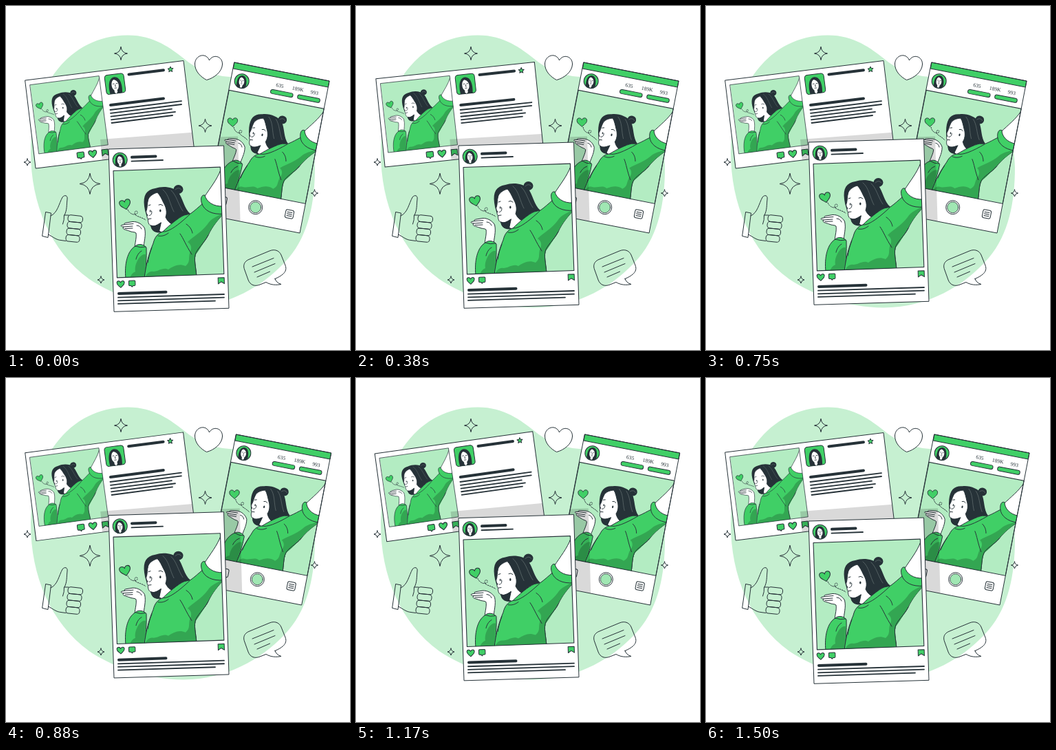
Animation of 500 by 500 pixels, one loop 1540 ms. Source, as an HTML page:

```html
<!DOCTYPE html>
<html lang="en">
<head>
<meta charset="utf-8">
<title>Selfie posts</title>
<style>
  html, body { margin: 0; height: 100%; overflow: hidden; background: #fff; }
  svg { display: block; width: 100%; height: 100%; }
  .o { fill: none; stroke: #263238; stroke-linecap: round; stroke-linejoin: round; }
  .w { fill: #fff; stroke: #263238; stroke-linejoin: round; }
  .g { fill: #40cf66; stroke: #263238; stroke-linejoin: round; }
  .k { fill: #263238; }
  .d { fill: #33a652; }
  .thick { stroke-width: 4; }
  .thin { stroke-width: 1.8; }
  text { font: 7.6px "Liberation Serif", serif; fill: #263238; text-anchor: middle; }
</style>
</head>
<body>
<svg viewBox="0 0 500 500">
  <defs>
    <clipPath id="square"><path d="M0 0H155.5V155.5H0Z"/></clipPath>
    <clipPath id="leftClip"><path d="M28 108L258 79.5L273.5 207.5L43.5 236Z"/></clipPath>
    <clipPath id="phoneClip"><path d="M332 82L470 109L427 330L289 303Z"/></clipPath>
    <clipPath id="disc"><circle r="10.3"/></clipPath>
    <clipPath id="tile"><rect x="-14" y="-14" width="28" height="28" rx="4"/></clipPath>

    <path id="spark" class="o" vector-effect="non-scaling-stroke" d="M0 -10Q1 -1 10 0Q1 1 0 10Q-1 1 -10 0Q-1 -1 0 -10Z"/>
    <path id="love" class="g" d="M0 5C-3 2 -5.5 1 -5.5 -2C-5.5 -5.5 -1 -5.5 0 -2.5C1 -5.5 5.5 -5.5 5.5 -2C5.5 1 3 2 0 5Z"/>
    <path id="chat" class="g" d="M-3.5 -4.2H3.5Q4.7 -4.2 4.7 -3V2Q4.7 3.2 3.5 3.2H1.5L0 5L-1.5 3.2H-3.5Q-4.7 3.2 -4.7 2V-3Q-4.7 -4.2 -3.5 -4.2Z"/>
    <path id="mark" class="g" d="M-4.5 -4.5H4.5V4.5L0 1.5L-4.5 4.5Z"/>

    <g id="face">
      <path class="k" d="M-6.5 11C-8 2 -7 -8 0 -8.3C7 -8 8 2 6.5 11Z"/>
      <path fill="#fff" d="M-1 -5.6C-4.5 -4 -4.4 2 -3 4.5L-1.6 6.3V8.5L0 10L1.6 8.5V6.3L3 4.5C4.4 2 4.5 -4 -1 -5.6Z"/>
      <path class="o" stroke-width=".6" d="M-2.4 -1H-1M1.2 -1H2.6M.2 0L-.2 2H.4M-.9 3.8H1"/>
    </g>

    <g id="photo">
      <g clip-path="url(#square)">
        <path fill="#b3ecc2" d="M0 0H156V156H0Z"/>
        <g transform="rotate(2) translate(-156 -239.5)" stroke-width="1">
          <path class="k" d="M201 291C199 275 204 267 217 265C228 261 243 263 250 270C257 279 259 295 268 302C263 305 254 304 250 310L238 321L226 329C216 331 210 325 210 317C205 308 202 300 201 291Z"/>
          <ellipse class="k" cx="250.500" cy="266.500" rx="7" ry="6.500"/>
          <path class="o" style="stroke:#7f8c8a" stroke-width=".5" d="M228 267C237 274 238 288 244 299M240 268C248 275 250 288 257 298M246 267Q251 262 255 267"/>
          <path class="w" d="M220 271C213 273 208 277 206.500 282C205 288 205.500 292 204.500 296C203 299 204 302 206 304C204 306 205.500 308 206.500 310C206 316 209 321 215 320C219 319 222 317 225 315L222 327L229 330L241 317C236 314 234 311 232 307C235 299 232 291 229 286C226 280 224 275 220 271Z"/>
          <ellipse class="k" cx="224.300" cy="297.500" rx="1.200" ry="2"/>
          <ellipse class="k" cx="209.600" cy="298" rx=".8" ry="1.800"/>
          <path class="o" d="M222 289Q225 287 228 290M207 290L210 289M211.500 298C213 302 210 305 208 304.500M207 309.500L211 309"/>
          <path class="k" d="M210 318Q216 322 226 314L223 328Q212 331 210 318Z"/>

          <path class="w" d="M312 238C307 252 297 264 288 278L296 300L318 300V234Z"/>

          <path class="w" d="M201.500 323C198 317 191 313 184 313.500L175 315C172 315.500 171 316.500 173 317.500L168 318.500C166 319.500 168 321 171 321L170 323C171 325 175 325.500 179 327C183 329 187 328 189 330C190 336 188 342 187 351L200 353C200 343 204 334 201.500 323Z"/>
          <path class="o" d="M173 317.500L185 316.500M171 321L184 320M173 323.500L184 323M190 319Q195 319 197 324"/>

          <path class="g" d="M188 349C176 356 172 376 174 396H203C202 382 205 366 204 351C200 346 192 345 188 349Z"/>
          <path class="d" d="M200 361C192 364 186 378 188 386C184 388 181 391 180 396H202C201 382 203 372 203 361Z"/>
          <path class="o" d="M188 349Q195 352 203 350M197 356C192 359 190 364 189 368"/>

          <path class="g" d="M201 396C203 377 208 359 214 345C216 336 221 330 228 328C237 319 250 308 259 304L268 302C275 297 280 292 285 288C282 280 284 274 289 275C291 284 301 292 316 291V302C308 311 300 320 294 333C288 345 277 353 275 362C273 372 277 384 277 396Z"/>
          <path class="d" d="M316 301C306 306 298 309 293 317C284 329 272 335 264 343C269 346 271 352 267 359C265 368 268 372 261 378C251 374 244 378 236 383C228 379 222 386 214 386C208 385 204 389 202 396H277C277 382 273 370 276 361C284 350 290 340 294 332C300 320 308 312 316 301Z"/>
          <path class="o" d="M228 328C236 329 250 319 267 303M221 334C226 335 231 334 236 330M285 288C288 297 300 304 316 302M253 331C258 338 261 347 270 361M212 351C209 359 207 366 206 373M262 317C267 320 270 325 271 330M294 333C288 345 277 353 275 362C273 372 277 384 277 396"/>

          <use href="#love" transform="translate(173.300 288.500) rotate(-14) scale(1.450)" stroke-width=".7"/>
          <path class="o" stroke-dasharray="1.600 1.600" d="M177 296C180 303 188 305 191 301C192 297 187 297 187 301C187 306 196 306 203 311"/>
        </g>
      </g>
      <path class="o" stroke-width="1.100" d="M0 0H155.500V155.500H0Z"/>
    </g>
  </defs>

  <path fill="#c6f0d1" d="M176 42.500C215 42 240 62 258 76C276 91 297 101 325 103C390 107 449 155 449 235C449 285 440 332 411 366C376 407 322 438 258 438.500C205 438 155 420 121 397C65 356 36 288 36 212C37 118 92 43 176 42.500Z"/>

  <use href="#spark" transform="translate(167 69) scale(.95)"/>
  <use href="#spark" transform="translate(289.500 174) scale(.95)"/>
  <use href="#spark" transform="translate(122 258.500) scale(1.500)"/>
  <use href="#spark" transform="translate(31 227) scale(.5)"/>
  <use href="#spark" transform="translate(448.500 272) scale(.5)"/>
  <use href="#spark" transform="translate(138 398) scale(.5)"/>

  <path class="w" d="M291.500 107.500C283 103 274.500 95 274.500 84C275 71 291 67 295.500 79C301 69 315 73 314.500 85C314 96 302 105 291.500 107.500Z"/>

  <g class="o">
    <path d="M58 299.500L65.500 301L61 336.500L53 334.500Z"/>
    <path d="M65 305C75 301 77 287 82 278C85 274 90 275 89 281C88 289 89 296 85 304L91 304M84.500 304Q85 311 82.500 317M61.500 332C69 336 73 340 80 340.500L87 341.500"/>
    <g transform="translate(100.500 309.500) rotate(6)">
      <rect x="-10.500" y="-5" width="21.500" height="9.600" rx="4"/>
      <rect x="-10.500" y="4.600" width="21" height="9.600" rx="4"/>
      <rect x="-10.500" y="14.200" width="20.500" height="9.600" rx="4"/>
      <rect x="-10.500" y="23.800" width="20" height="9.600" rx="4"/>
    </g>
    <path d="M391 396.500C404 391 409 385 406 377L400 362C397 355 390 353 383 356L354 368C346 371 344 377 347 384L352 398C355 406 362 408 369 405L378 401.500C385 405.500 392 406 400 404.500C395 403 392 400 391 396.500Z"/>
    <path d="M358 379L389 366.500M361 387L391 374.500M365 394L383.500 386"/>
  </g>

  <g id="left">
    <path fill="#fff" d="M28 108L258 79.500L273.500 207.500L43.500 236Z"/>
    <use href="#photo" transform="translate(35 114.600) rotate(-7.400) scale(.65)"/>
    <g transform="translate(158.500 113.200) rotate(-7.400)">
      <rect class="g" x="-14" y="-14" width="28" height="28" rx="4"/>
      <g clip-path="url(#tile)"><use href="#face" transform="translate(0 1) scale(1.320)"/></g>
    </g>
    <path class="o thick" d="M178.500 99.500L229 93.200M152 144L229 134.500"/>
    <path class="o thin" d="M151.500 151L255 138.200M152 155.800L255 143M152.500 160.700L241 149.700M153 165.300L246 153.800M153.500 170L242 159"/>
    <path class="g" d="M239 88L240.200 90.600L243 90.700L241 92.700L241.700 95.500L239.200 94.200L236.800 95.800L237.200 93L235 91.200L237.800 90.700Z"/>
    <use href="#chat" transform="translate(108.500 217) rotate(-7) scale(1.080)"/>
    <use href="#love" transform="translate(126 215) rotate(-7) scale(1.080)"/>
    <use href="#mark" transform="translate(144 213) rotate(-7)"/>
    <path clip-path="url(#leftClip)" fill-opacity=".15" d="M137 194L280 183V240H141Z"/>
    <path class="o" d="M28 108L258 79.500L273.500 207.500L43.500 236Z"/>
  </g>

  <g id="phone">
    <path fill="#fff" d="M332 82L470 109L427 330L289 303Z"/>
    <path class="g" d="M332 82L470 109L468.300 118L330.300 91Z"/>
    <g transform="translate(342.700 109.200) rotate(8)">
      <circle class="g" r="10.500"/>
      <g clip-path="url(#disc)"><use href="#face"/></g>
    </g>
    <g transform="translate(398 115.500) rotate(11)"><text y="2.600">635</text></g>
    <g transform="translate(424.300 120.500) rotate(11)"><text y="2.600">189K</text></g>
    <g transform="translate(448.300 125.800) rotate(11)"><text y="2.600">993</text></g>
    <rect class="g" x="-16.500" y="-3" width="33" height="6" rx="3" transform="translate(400.800 127) rotate(11)"/>
    <rect class="g" x="-16.500" y="-3" width="33" height="6" rx="3" transform="translate(440 134.700) rotate(11)"/>
    <use href="#photo" transform="translate(324.200 122.300) rotate(11.070) scale(.904)"/>
    <circle class="w" cx="362.700" cy="292.700" r="10"/>
    <circle class="o" cx="362.700" cy="292.700" r="8" style="fill:#a0e7b3" stroke-width=".8"/>
    <g class="o" transform="translate(412 302.500) rotate(11)">
      <rect x="-6" y="-6" width="12" height="12" rx="2.500"/>
      <path d="M-3.500 -2.700H3.500M-3.500 0H3.500M-3.500 2.700H3.500"/>
    </g>
    <rect class="o" x="-6" y="-6" width="12" height="12" rx="2.500" transform="translate(314.800 283) rotate(11)"/>
    <path clip-path="url(#phoneClip)" fill-opacity=".15" d="M290 191L337 189.500L340.800 320H290Z"/>
    <path class="o" d="M332 82L470 109L427 330L289 303Z"/>
  </g>

  <g id="front">
    <path class="w" d="M149 208L316.500 203L324 439.300L157 444.300Z"/>
    <g transform="translate(165.700 223.700) rotate(-2)">
      <circle class="g" r="10.500"/>
      <g clip-path="url(#disc)"><use href="#face"/></g>
    </g>
    <path class="o thick" d="M183 219.800L217.500 218.500M164 418L232.500 415.700"/>
    <path class="o thin" d="M182.500 225.700L228 224M163 423.700L317 419M163 428.300L317 423.600M163 432.900L304 428.600"/>
    <use href="#photo" transform="translate(156 239.500) rotate(-2)"/>
    <use href="#love" transform="translate(166.700 404.300) rotate(-2)"/>
    <use href="#chat" transform="translate(183.200 403.300) rotate(-2)"/>
    <use href="#mark" transform="translate(312.800 399.300) rotate(-2)"/>
  </g>
</svg>
<script>
  const LOOP = 1540, FPS = 24, STEPS = 36;
  const [left, phone, front] = ["left", "phone", "front"].map(id => document.getElementById(id));

  // Tracks are evenly spaced values over one cycle, joined linearly.
  const shake = [0, -1, 2, -4, 4, -4, 4, -4, 2, -1, 0];
  const sway = [0, 1, 0, -1, 0];
  const lift = [0, -10, 0];

  function at(track, p) {
    const x = p * (track.length - 1);
    const i = Math.min(Math.floor(x), track.length - 2);
    return track[i] + (track[i + 1] - track[i]) * (x - i);
  }

  function draw() {
    const t = performance.now() % LOOP;
    const p = Math.min(STEPS, Math.floor((t + 5) * FPS / 1000)) / STEPS;
    left.setAttribute("transform", `rotate(${at(sway, p)} 150.700 157.700)`);
    phone.setAttribute("transform", `translate(${at(shake, p)} 0)`);
    front.setAttribute("transform", `translate(0 ${at(lift, p)})`);
    requestAnimationFrame(draw);
  }
  draw();
</script>
</body>
</html>
```
